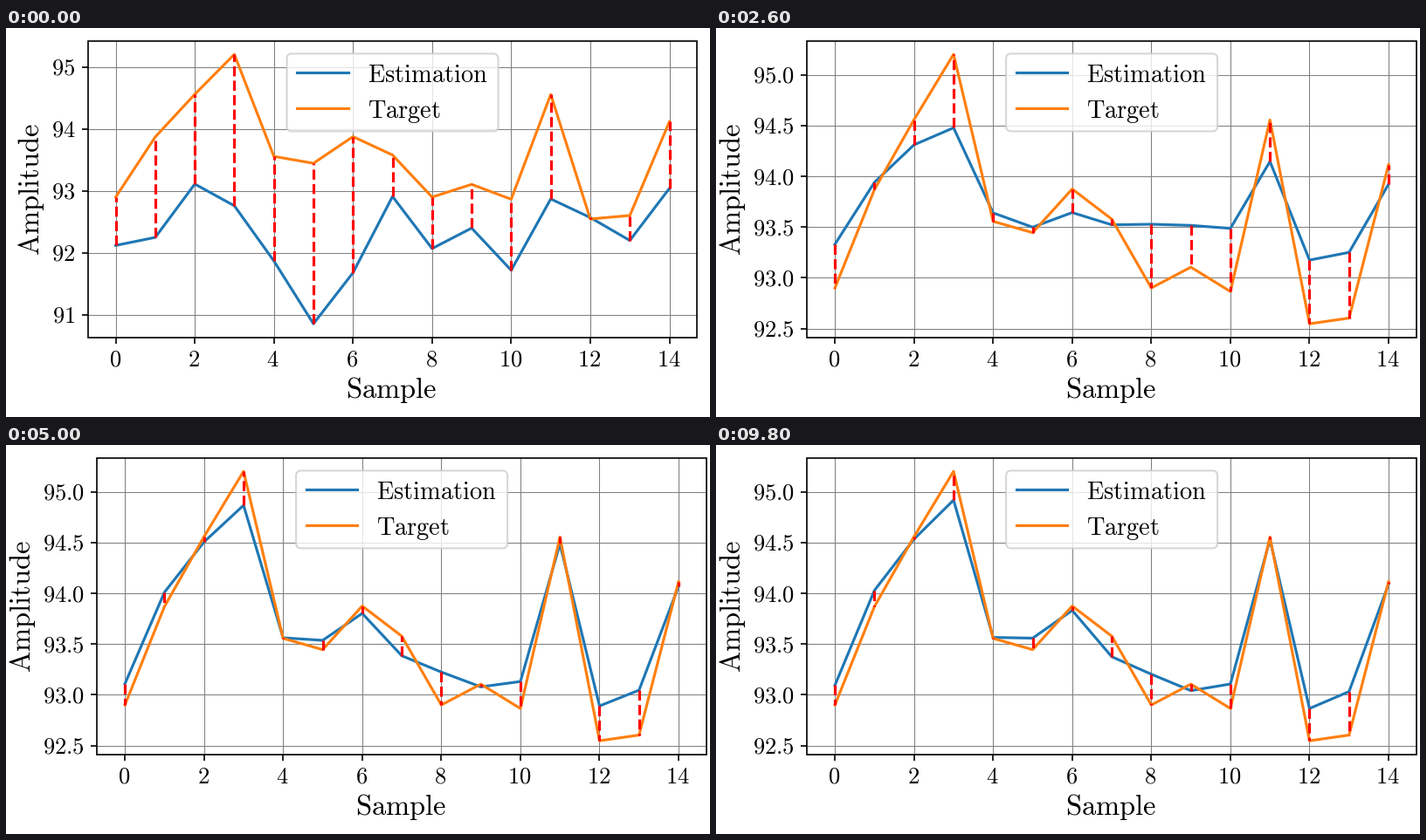
A matplotlib script that plays this animation: 806x446 px, repeating every 10000 ms.

```python
import numpy as np
import matplotlib.pyplot as plt
from matplotlib.animation import FuncAnimation
from matplotlib.patches import FancyBboxPatch, Rectangle

W, H, DPI = 806, 446, 128
PT = 72 / DPI                      # points per pixel
FRAMES, STEP = 50, 200
TOP, BOTTOM, WIDTH = 14.75, 354.55, 697.3
BLUE, ORANGE = "#1f77b4", "#ff7f0e"

plt.rcParams["mathtext.fontset"] = "cm"

target = np.array([92.9, 93.87, 94.558, 95.202, 93.556, 93.445, 93.875, 93.578,
                   92.9, 93.105, 92.865, 94.555, 92.547, 92.603, 94.115])
start = np.array([92.12, 92.25, 93.11, 92.76, 91.87, 90.857, 91.68, 92.91,
                  92.07, 92.4, 91.72, 92.87, 92.57, 92.2, 93.04])
miss = np.array([0.2, 0.17, -0.015, -0.27, 0.02, 0.13, -0.03, -0.2,
                 0.31, -0.06, 0.25, -0.015, 0.32, 0.434, -0.017])
samples = np.arange(len(target))
fitted = target + miss
plateau = 93.84 + 0.3 * np.cos(2 * np.pi * (samples - 2.3) / 6.8)


def estimate(n):
    """Leaves the start quickly, lingers near a flat guess, then settles."""
    pull = (1 + n) ** -1.3
    slack = np.interp(n, [0, 4, 13, 21, 30], [0, 0.35, 0.45, 0.07, 0])
    return fitted + pull * (start - fitted) + slack * (plateau - fitted)


fig = plt.figure(figsize=(W / DPI, H / DPI), dpi=DPI, facecolor="white")
ax = fig.add_axes([0, 0, 1, 1])


def line(x, y, color, width, z, **style):
    ax.plot(x, y, color=color, lw=width * PT, zorder=z, **style)


def text(x, y, word, size, ha="center", rotation=0):
    ax.text(x, y, r"$\mathrm{%s}$" % word, fontsize=size * PT, ha=ha, va="baseline",
            rotation=rotation, rotation_mode="anchor", zorder=7)


def legend(cx):
    x, y, w, h = cx - 121, 29.4, 242, 89
    ax.add_patch(FancyBboxPatch((x, y), w, h, boxstyle="round,pad=0,rounding_size=5.8",
                                fc="white", ec="0.8", lw=2.08 * PT, alpha=0.8, zorder=5))
    for row, color, word in ((51.3, BLUE, "Estimation"), (92.2, ORANGE, "Target")):
        line([x + 11.7, x + 70], [row, row], color, 3.125, 6)
        text(x + 92.3, row + 10.5, word, 28.4, ha="left")


def draw(n):
    ax.clear()
    ax.set_axis_off()
    ax.set_xlim(0, W)
    ax.set_ylim(H, 0)

    est = estimate(n)
    both = np.concatenate([est, target])
    lo, hi = both.min(), both.max()
    wide = hi - lo > 3.5
    tick, digits = (1, 0) if wide else (0.5, 1)
    left, label_x = (93.9, 38.2) if wide else (104.45, 27.8)
    right, mid = left + WIDTH, left + WIDTH / 2

    def px(s):
        return mid + (s - 7) * WIDTH / 15.4

    def py(v):
        return BOTTOM - (BOTTOM - TOP) * ((v - lo) / (hi - lo) + 0.05) / 1.1

    for s in samples[::2]:
        x = px(s)
        line([x, x], [TOP, BOTTOM], "gray", 1.04, 1)
        line([x, x], [BOTTOM, BOTTOM + 7.3], "black", 1.67, 4, solid_capstyle="butt")
        text(x - 1, 387.8, str(s), 26.5)
    for v in np.arange(90, 96, tick):
        y = py(v)
        if TOP < y < BOTTOM:
            line([left, right], [y, y], "gray", 1.04, 1)
            line([left - 7.3, left], [y, y], "black", 1.67, 4, solid_capstyle="butt")
            text(left - 14.6, y + 9, f"{v:.{digits}f}", 26.5, ha="right")

    x, ye, yt = px(samples), py(est), py(target)
    line(x, ye, BLUE, 3.125, 2)
    line(x, yt, ORANGE, 3.125, 2)
    for xi, a, b in zip(x, ye, yt):
        line([xi, xi], [a, b], "red", 3.125, 3, ls="--")

    ax.add_patch(Rectangle((left, TOP), WIDTH, BOTTOM - TOP, fill=False,
                           ec="black", lw=1.67 * PT, zorder=4))
    legend(mid)
    text(mid - 1.2, 424.3, "Sample", 32.6)
    text(label_x, 185, "Amplitude", 32.6, rotation=90)
    return []


anim = FuncAnimation(fig, draw, frames=FRAMES, init_func=lambda: draw(0),
                     interval=STEP, repeat=True, repeat_delay=0, blit=False)
plt.show()
```
